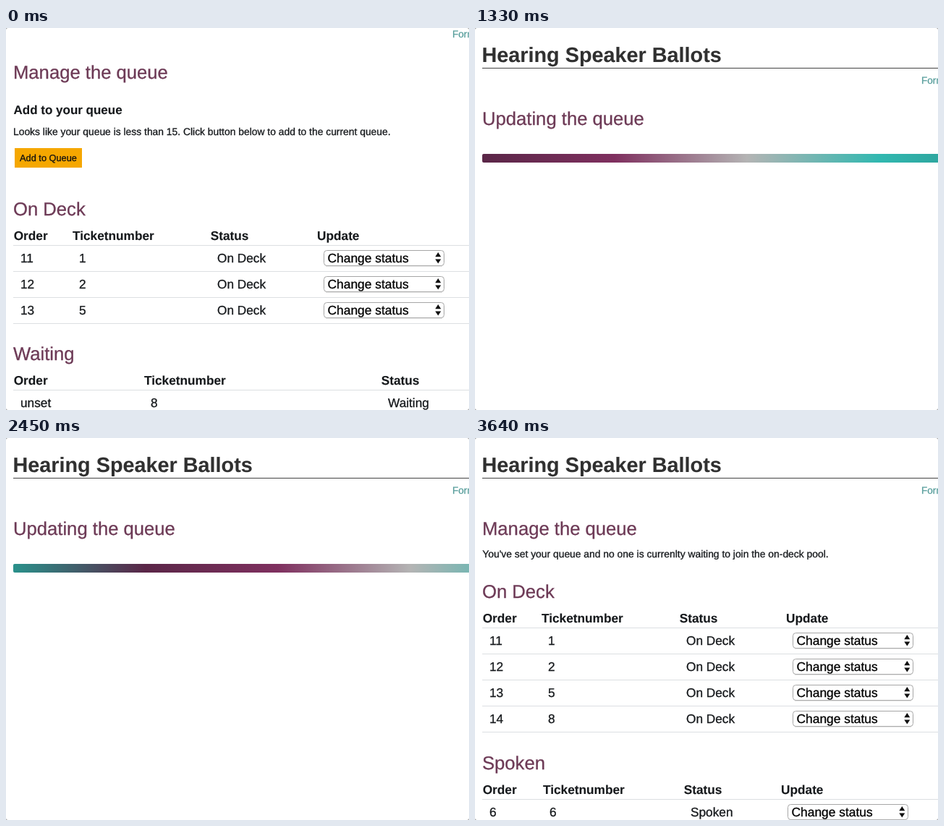
Recreate the animation shown at these times as an HTML page. Size 640 px wide and 528 px high, loop 3.71 s.

```html
<!DOCTYPE html>
<html lang="en">
<head>
<meta charset="utf-8">
<title>Queue manager</title>
<style>
  html, body { margin: 0; width: 100%; height: 100%; overflow: hidden; background: #999; }
  #stage { position: absolute; left: 0; top: 0; width: 640px; height: 528px; overflow: hidden; background: #fff; border-radius: 3px; }
  svg, .scene { position: absolute; left: 0; top: 0; width: 640px; height: 528px; display: block; }
  text {
    font: 17.25px "Liberation Sans", Arial, sans-serif; white-space: pre;
    color: #16191c; fill: currentColor; stroke: currentColor; stroke-width: .3px;
    text-rendering: geometricPrecision;
  }
  .h1 { font-size: 28.8px; font-weight: bold; color: #303030; }
  .h2 { font-size: 25.65px; color: #6d3a56; }
  .h3 { font-size: 17px; font-weight: bold; }
  .th text { font-weight: bold; }
  .h1, .h3, .th text { stroke-width: .1px; }
  .note { font-size: 13.87px; }
  .link { font-size: 13.6px; color: #5a9f9d; }
  .btn { font-size: 12.8px; color: #111; }
  .option { font-size: 17.4px; color: #000; }
  .rule { stroke: #dcdfe2; }
  .box { fill: #fff; stroke: #a6a6a6; }

  .scene, .hover, .bar { animation: 3710ms step-end infinite; }
  .first { animation-name: first; }
  .busy { animation-name: busy; }
  .last { animation-name: last; }
  .hover { animation-name: hover; }
  @keyframes first { 0% { visibility: visible } 35.84%, 100% { visibility: hidden } }
  @keyframes busy { 0% { visibility: hidden } 35.84% { visibility: visible } 79.24%, 100% { visibility: hidden } }
  @keyframes last { 0% { visibility: hidden } 79.24%, 100% { visibility: visible } }
  @keyframes hover { 0% { opacity: 0 } 20.75%, 100% { opacity: 1 } }

  /* five colours, rotated one place to the right at each step */
  .bar {
    --seg: 183px;
    position: absolute; left: 10px; top: 174px; width: 630px; height: 12px;
    border-radius: 2px 0 0 2px;
    background: linear-gradient(to right, #5a2647, #7f305f, #b4b4b4, #31b8b0, #2a918b, #5a2647) 0 0 / calc(5 * var(--seg)) 100% repeat-x;
    animation-name: rotate;
  }
  @keyframes rotate {
    0%, 35.84%, 62.26% { background-position-x: 0 }
    41.5%, 66.03% { background-position-x: calc(-4 * var(--seg)) }
    47.16%, 71.69% { background-position-x: calc(-3 * var(--seg)) }
    52.82%, 77.35%, 100% { background-position-x: calc(-2 * var(--seg)) }
    56.6% { background-position-x: calc(-1 * var(--seg)) }
  }
</style>
</head>
<body>
<div id="stage">
  <svg width="0" height="0" aria-hidden="true">
    <defs>
      <g id="select">
        <rect class="box" x="439.5" y="-10.5" width="166" height="21" rx="4"/>
        <path d="M442 10.9H603" stroke="#b4b4b4"/>
        <text class="option" x="444.5" y="6">Change status</text>
        <path d="M593.3-1.8l4-6.2 4 6.2zM593.3 1.4l4 6.2 4-6.2z" fill="#111"/>
      </g>
      <g id="status">
        <text x="292" y="6">On Deck</text>
        <use href="#select"/>
        <path class="rule" d="M10 18.5H640"/>
      </g>
      <g id="deck">
        <text class="h2" x="10" y="259">On Deck</text>
        <g class="th">
          <text x="10.7" y="293">Order</text>
          <text x="92" y="293">Ticketnumber</text>
          <text x="282.7" y="293">Status</text>
          <text x="430" y="293">Update</text>
        </g>
        <path class="rule" d="M10 300.5H640"/>
        <g transform="translate(0 318)"><text x="20" y="6">11</text><text x="101" y="6">1</text><use href="#status"/></g>
        <g transform="translate(0 354)"><text x="20" y="6">12</text><text x="101" y="6">2</text><use href="#status"/></g>
        <g transform="translate(0 390)"><text x="20" y="6">13</text><text x="101" y="6">5</text><use href="#status"/></g>
      </g>
      <g id="header">
        <text class="h1" x="9.5" y="47">Hearing Speaker Ballots</text>
        <path d="M10 55.5H640" stroke="#444"/>
        <text class="link" x="617" y="77">Form</text>
      </g>
    </defs>
  </svg>

  <div class="scene first">
    <svg viewBox="0 0 640 528">
      <text class="link" x="617" y="13">Form</text>
      <text class="h2" x="10" y="70">Manage the queue</text>
      <text class="h3" x="10.5" y="119">Add to your queue</text>
      <text class="note" x="10" y="148">Looks like your queue is less than 15. Click button below to add to the current queue.</text>
      <rect x="12" y="166" width="93" height="27" fill="#f5a700"/>
      <rect class="hover" x="10" y="164" width="97" height="31" fill="#f5a700"/>
      <text class="btn" x="19" y="184">Add to Queue</text>
      <use href="#deck"/>
      <text class="h2" x="10" y="459">Waiting</text>
      <g class="th">
        <text x="10.7" y="493">Order</text>
        <text x="191" y="493">Ticketnumber</text>
        <text x="518.7" y="493">Status</text>
      </g>
      <path class="rule" d="M10 500.5H640"/>
      <text x="20" y="524">unset</text>
      <text x="200" y="524">8</text>
      <text x="528" y="524">Waiting</text>
    </svg>
  </div>

  <div class="scene busy">
    <svg viewBox="0 0 640 528">
      <use href="#header"/>
      <text class="h2" x="10" y="134">Updating the queue</text>
    </svg>
    <div class="bar"></div>
  </div>

  <div class="scene last">
    <svg viewBox="0 0 640 528">
      <use href="#header"/>
      <text class="h2" x="10" y="134">Manage the queue</text>
      <text class="note" x="10.3" y="165">You've set your queue and no one is currenlty waiting to join the on-deck pool.</text>
      <use href="#deck" y="-38"/>
      <g transform="translate(0 388)"><text x="20" y="6">14</text><text x="101" y="6">8</text><use href="#status" y="-38" transform="translate(0 38)"/></g>
      <text class="h2" x="10" y="458">Spoken</text>
      <g class="th">
        <text x="10.7" y="492">Order</text>
        <text x="94" y="492">Ticketnumber</text>
        <text x="288.7" y="492">Status</text>
        <text x="423" y="492">Update</text>
      </g>
      <path class="rule" d="M10 499.5H640"/>
      <text x="20" y="523">6</text>
      <text x="103" y="523">6</text>
      <text x="298" y="523">Spoken</text>
      <use href="#select" x="-7" y="517"/>
    </svg>
  </div>
</div>
</body>
</html>
```
